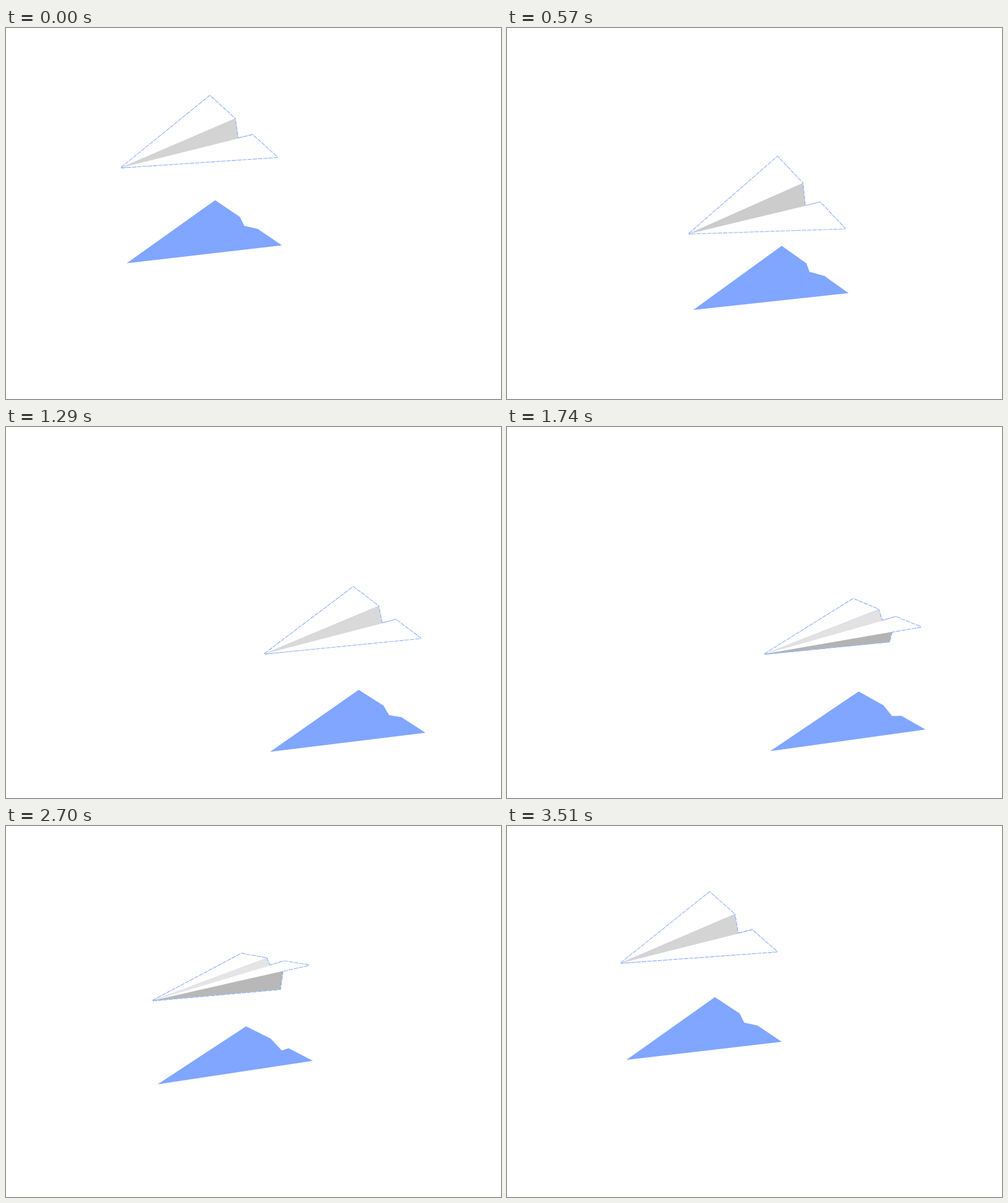
Animation of 800x600 px, one loop 3.54 s. Source, as an HTML page with a canvas:

```html
<!DOCTYPE html>
<html lang="en">
<head>
<meta charset="utf-8">
<title>Paper plane</title>
<style>
html, body { margin: 0; width: 100%; height: 100%; overflow: hidden; background: #fff; }
canvas { display: block; }
</style>
</head>
<body>
<canvas id="stage" width="800" height="600"></canvas>
<script>
const ctx = document.getElementById('stage').getContext('2d');
const LOOP = 3540, STEP = 30, BLUE = '#80a6ff';

// time, shadow nose x, shadow nose y, height above ground, roll
const keys = [
  [0, 195, 380.5, 154.7, 49.7],
  [285, 234.5, 409, 136.5, 56.5],
  [570, 301, 456, 123.3, 58.2],
  [825, 358, 489, 128, 55.5],
  [1080, 406, 514.7, 145.7, 49.5],
  [1290, 427, 525.3, 158.6, 41.5],
  [1515, 431, 526.7, 165.5, 32.5],
  [1620, 430, 526.2, 164.7, 28.5],
  [1740, 425.3, 524.3, 157.2, 22.7],
  [1980, 393.5, 508.5, 141.5, 13],
  [2220, 344, 482, 129.4, 7],
  [2460, 295.5, 451, 125.5, 5.5],
  [2700, 245, 417.8, 135.6, 9.3],
  [2970, 205, 388, 152.5, 19.5],
  [3240, 187, 374, 168.3, 32],
  [3390, 188, 374.5, 166, 42],
  [3510, 193, 378.3, 156.7, 48.2]
];

function keyAt(i) {
  const n = keys.length, turn = Math.floor(i / n), k = keys[i - turn * n];
  return [k[0] + turn * LOOP, ...k.slice(1)];
}

function tangent(i, c) {
  const a = keyAt(i - 1), b = keyAt(i), d = keyAt(i + 1);
  const h0 = b[0] - a[0], h1 = d[0] - b[0];
  return ((b[c] - a[c]) / h0 * h1 + (d[c] - b[c]) / h1 * h0) / (h0 + h1);
}

// Smooth periodic curve through the keys
function sample(t) {
  let i = keys.length - 1;
  while (keys[i][0] > t) i--;
  const a = keyAt(i), b = keyAt(i + 1), span = b[0] - a[0];
  const u = (t - a[0]) / span, v = 1 - u;
  return [1, 2, 3, 4].map(c =>
    a[c] * v * v * (1 + 2 * u) + b[c] * u * u * (3 - 2 * u) +
    span * u * v * (v * tangent(i, c) - u * tangent(i + 1, c)));
}

function trace(x, y, points) {
  ctx.beginPath();
  ctx.moveTo(x, y);
  for (const [dx, dy] of points) ctx.lineTo(x + dx, y + dy);
  ctx.closePath();
}

const gray = v => `rgb(${v},${v},${v})`;

function draw(t) {
  const [sx, sy, lift, r] = sample(t);
  const x = sx - lift * 0.057, y = sy - lift;

  ctx.fillStyle = '#fff';
  ctx.fillRect(0, 0, 800, 600);

  trace(sx, sy, [
    [143, -92 - 0.2 * r],
    [183, -73.5 - 0.03 * r],
    [203 - 0.26 * r, -53.5 - 0.14 * r],
    [212, -59 + 0.07 * r],
    [251, -40 + 0.22 * r]
  ]);
  ctx.fillStyle = BLUE;
  ctx.fill();

  const leftTip = [143.3, -66.7 - r], rightTip = [252.5, -66.5 + r];
  const leftFold = [184, -66 - 0.27 * r], rightFold = [212.3, -66 + 0.26 * r];
  const keel = [209 - 0.33 * r, -17 - 0.13 * r];
  const faces = [
    [[leftTip, leftFold], '#fff'],
    [[leftFold, keel], gray(Math.round(230 - 0.0078 * r * r))],
    [[keel, rightFold], gray(Math.round(188 - 0.4 * r))],
    [[rightFold, rightTip], '#fff']
  ];

  // Strokes first: the fills leave only the silhouette visible
  ctx.strokeStyle = BLUE;
  ctx.lineWidth = 2;
  ctx.lineJoin = 'bevel';
  ctx.setLineDash([7, 1.5]);
  for (const [points] of faces) {
    trace(x, y, points);
    ctx.stroke();
  }
  for (const [points, color] of faces) {
    trace(x, y, points);
    ctx.fillStyle = color;
    ctx.fill();
  }
}

const start = performance.now();
function tick() {
  const t = (performance.now() - start) % LOOP;
  draw(Math.floor(t / STEP) * STEP);
  requestAnimationFrame(tick);
}
tick();
</script>
</body>
</html>
```
